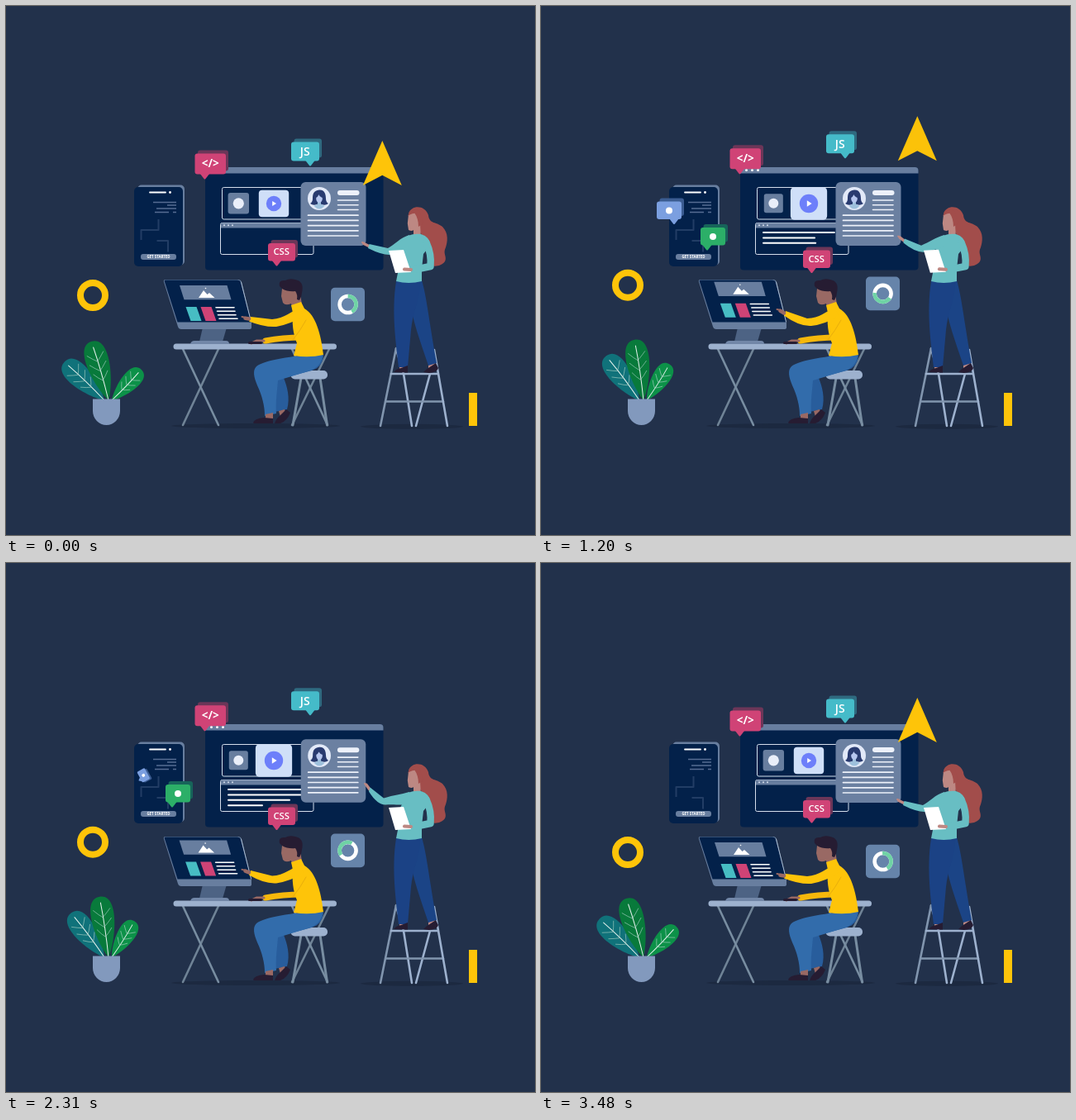
These frames come from a looping animation (640 px wide and 640 px high, 3.51 s). An HTML page with a canvas:

```html
<!DOCTYPE html>
<html lang="en">
<head>
<meta charset="utf-8">
<title>Web design team</title>
<style>
html, body { margin: 0; width: 100%; height: 100%; overflow: hidden; background: #22314b; }
canvas { display: block; width: 640px; height: 640px; }
</style>
</head>
<body>
<canvas id="stage" width="640" height="640"></canvas>
<script>
const ctx = document.getElementById('stage').getContext('2d');
const LOOP = 3510, STEP = 30;
const NAVY = '#03214a', SLATE = '#687e9f', STEEL = '#9db1ce', YELLOW = '#fec409';
const TEAL = '#68bec3', SKIN = '#bd8883', BROWN = '#996964', DARK = '#261c32';

const lerp = (a, b, k) => a + (b - a) * k;
const ramp = (t, a, b) => (1 - Math.cos(Math.PI * Math.min(1, Math.max(0, (t - a) / (b - a))))) / 2;
const rad = deg => deg * Math.PI / 180;

function fill(path, color) {
  ctx.fillStyle = color;
  ctx.fill(new Path2D(path));
}
function stroke(path, color, width = 1, cap = 'round') {
  ctx.strokeStyle = color;
  ctx.lineWidth = width;
  ctx.lineCap = cap;
  ctx.lineJoin = 'round';
  ctx.stroke(new Path2D(path));
}
function box(x, y, w, h, r, color) {
  ctx.fillStyle = color;
  ctx.beginPath();
  ctx.roundRect(x, y, w, h, r);
  ctx.fill();
}
function oval(x, y, rx, ry, color) {
  ctx.fillStyle = color;
  ctx.beginPath();
  ctx.ellipse(x, y, rx, ry, 0, 0, 2 * Math.PI);
  ctx.fill();
}
const disc = (x, y, r, color) => oval(x, y, r, r, color);
function arc(x, y, r, from, to, color, width) {
  ctx.strokeStyle = color;
  ctx.lineWidth = width;
  ctx.lineCap = 'butt';
  ctx.beginPath();
  ctx.arc(x, y, r, rad(from), rad(to));
  ctx.stroke();
}
function label(text, x, y, size, color = '#fff', weight = 600) {
  ctx.font = `${weight} ${size}px "Open Sans", "Noto Sans", sans-serif`;
  ctx.textAlign = 'center';
  ctx.textBaseline = 'alphabetic';
  ctx.fillStyle = color;
  ctx.fillText(text, x, y);
}
// Draws in a frame moved, turned and scaled about (x, y).
function about(x, y, angle, scale, draw) {
  ctx.save();
  ctx.translate(x, y);
  ctx.rotate(angle);
  ctx.scale(scale, scale);
  draw();
  ctx.restore();
}

function bubble(x, y, w, h, tail, color, shade) {
  box(x + 3.5, y - 4, w - 0.5, h, 3, shade);
  box(x, y, w, h, 3, color);
  fill(`M${x + tail - 6} ${y + h - 1}h12l-5 6.5q-1 1-2 0Z`, color);
}

function phone() {
  box(159, 216.5, 57, 97, 5, SLATE);
  box(155, 219, 59, 96, 5, NAVY);
  stroke('M174 225.5H193', '#fff', 1.8);
  disc(198.5, 225.5, 1.4, '#fff');
  stroke('M178 237.5H206M195 241H206M182 245H206M180 249.5H197M202 249.5H206', '#566c92', 1.7, 'butt');
  stroke('M163.5 283V271H184.5V258M182.5 284H196V297.5', '#223d65', 2, 'butt');
  box(163, 300, 43, 7, 3, SLATE);
  label('GET STARTED', 184.5, 305.3, 4.4, '#fff', 700);
}

function platformTag(tailX, tailY, dx, scale, turn, color, shade) {
  if (scale < 0.01) return;
  about(tailX, tailY, rad(turn * (1 - scale)), scale, () => {
    bubble(dx, -26.5, 30, 21.5, -dx, color, shade);
    disc(dx + 15, -15.5, 4, '#fff');
  });
}

function board(t, p) {
  box(241, 195, 215.5, 124.5, 4, NAVY);
  box(241, 195, 215.5, 7.5, [4, 4, 0, 0], SLATE);
  for (let i = 0; i < 3; i++) disc(248.5 + 7 * i, 198.5, 1.5, '#fff');

  ctx.strokeStyle = '#d5deec';
  ctx.lineWidth = 1;
  ctx.beginPath();
  ctx.roundRect(261.5, 219.5, 110, 38.5, 2);
  ctx.roundRect(259.5, 262.5, 112.5, 38, 2);
  ctx.stroke();

  about(281.3, 238.8, 0, 1 - 0.12 * p, () => {
    box(-12.7, -12.7, 25.4, 25.4, 3, SLATE);
    disc(0, 0, 6.6, '#e9eef9');
  });
  about(324, 239, 0, 1 + 0.28 * p, () => {
    box(-18.2, -16.3, 36.4, 32.6, 4, '#cfdff8');
    disc(0, 0, 9.2, '#6d7ffa');
    fill('M-1.8 -3L3 0L-1.8 3Z', '#fff');
  });

  box(260, 262.5, 112, 6, [2, 2, 0, 0], SLATE);
  for (let i = 0; i < 3; i++) disc(264 + 5 * i, 265.3, 1, '#d5deec');
  const away = 1 - ramp(t, 2760, 3260);
  [[450, 900, 92], [740, 750, 92], [600, 800, 74], [1200, 700, 41]].forEach(([start, span, len], i) => {
    const w = len * ramp(t, start, start + span) * away;
    if (w > 0.5) stroke(`M269 ${274 + 6.4 * i}h${w}`, '#fff', 2);
  });
}

function profileCard(t) {
  const press = ramp(t, 1680, 1980) - ramp(t, 2050, 2400);
  about(396, 251.5, 0, 1 - 0.04 * press, () => {
    ctx.translate(-396, -251.5);
    box(356.5, 213, 79, 77, 6, '#6b80a1');
    disc(379, 233, 14, '#e2e9f8');
    fill('M379 222.5C386 222 387 229 387 233Q387 237 390 239Q386 242 382 240H376Q372 242 368 239Q371 237 371 233C371 228 372 223 379 222.5Z', '#293b70');
    fill('M377 236h4v3.5l4.5 2.5q-6.5 7-13 0l4.5-2.5Z', '#9dc0dc');
    oval(379, 233, 3.8, 5, '#b6c6ef');
    fill('M374.5 232q0-6 4.5-6q5.500 0 4.500 6q-4-1-5-4q-1 3-4 4Z', '#293b70');
    box(401, 223, 26.5, 6, 3, '#edf1fa');
    stroke('M401.5 235H426M401.5 240.7H426M401.5 246.5H426', '#edf1fa', 1.6);
    for (let i = 0; i < 5; i++) stroke(`M365.5 ${253.2 + 6.2 * i}H426`, '#edf1fa', 1.7);
  });
}

function pointer(t) {
  const spin = 2 * Math.PI * ramp(t, 0, 690);
  const rise = t > 690 ? 73 * Math.min(1, (t - 690) / 800) ** 2 : 0;
  const back = t > 2000;
  ctx.globalAlpha = back ? ramp(t, 2760, 3250) : 1 - ramp(t, 1180, 1490);
  about(455.3, back ? 188.8 : 188.8 - rise, back ? 0 : spin, 1, () => fill('M0 -25.8L23.5 28.2L0 16L-23.5 28.2Z', YELLOW));
  ctx.globalAlpha = 1;
}

function leaf(x, y, angle, len, width, color) {
  about(x, y, rad(angle), 1, () => {
    const w = width, l = -len;
    fill(`M0 0C${-0.45 * w} ${0.25 * l} ${-0.95 * w} ${l} 0 ${l}C${0.95 * w} ${l} ${0.45 * w} ${0.25 * l} 0 0Z`, color);
    stroke(`M0 0Q${0.06 * w} ${0.5 * l} 0 ${0.9 * l}`, '#e3f1ec', 1);
    for (let i = 0; i < 3; i++) {
      const y0 = l * (0.34 + 0.16 * i), y1 = y0 + l * 0.13, reach = w * (0.34 + 0.05 * Math.min(i, 1));
      stroke(`M${-reach} ${y1}Q${-0.15 * w} ${y0 + l * 0.04} 0 ${y0}Q${0.15 * w} ${y0 + l * 0.04} ${reach} ${y1}`, '#a5cfc2', 0.6);
    }
  });
}
function plant(p) {
  leaf(119, 477, -46 + 12 * p, 67, 25, '#10727a');
  leaf(128, 477, 44 - 15 * p, 51.5, 20, '#0c9148');
  leaf(124, 477, -16 + 10 * p, 74, 26, '#087a3b');
  fill('M105 475.5H138V490A16.5 17 0 0 1 105 490Z', '#8299bd');
}

function computer(a) {
  fill('M238 389H267L262 406H234Z', '#4d6384');
  fill('M223 409Q224 405 228 405H266Q270 405 270 409Z', '#7287a8');
  fill('M193 331H281Q284 331 285 334L297 383V389Q297 391 294 391H212Q209 391 208 388L191 334Q190 331 193 331Z', SLATE);
  fill('M193 331.5H280Q283 331.5 284 334L296.500 382.5H207.5L192 334Q191 331.5 193 331.5Z', NAVY);
  stroke('M284.500 334L296.5 382', '#b5c4d8', 0.9);
  ctx.save();
  ctx.translate(-0.7 * a, -4.2 * a);
  fill('M210 338H267.5L272.5 355.2H215.5Z', SLATE);
  fill('M233 353L239 344L243.5 349L246 347L252.5 353Z', '#fff');
  disc(241.5, 341.5, 0.8, '#fff');
  fill('M217.5 364H230.5L236.5 381H223.5Z', '#47bdc3');
  fill('M235.5 364H248.5L254.5 381H241.5Z', '#cf4376');
  stroke('M254 364.7H276M255.5 369.2H277M256.5 373.7H278M258 378.2H280', '#fff', 1.6);
  ctx.restore();
}

function desk() {
  stroke('M257 415L214 507M391 415L346 507', '#6f8396', 2.6);
  stroke('M214 415L257 507M346 415L389 507', '#788da1', 2.6);
  box(202.5, 408.5, 197.5, 7, 3.5, STEEL);
}
function stool() {
  stroke('M357 450L347 507M380 450L388.5 507', '#788da1', 3);
  box(344.5, 441, 44.5, 10.5, 5, STEEL);
}

function man(a) {
  // legs and shoes
  fill('M384 422C350 425 325 428 313 438C309 445 320 470 325 491L340 488C344 474 340 460 336 450L370 441Q384 436 384 422Z', '#285d9c');
  fill('M383 420C345 424 313 428 303 436C298 441 300 449 304 459C310 472 313 484 313 496L327 493C326 478 328 466 329 453L362 443Q383 438 383 420Z', '#326cab');
  fill('M314 494L323 492L323 500H314Z', BROWN);
  fill('M330 490L337 488L339 494L332 497Z', BROWN);
  fill('M299 504Q301 499 312 498L323 499V505H301Q299 505 299 504Z', DARK);
  fill('M325 505Q327 499 332 495L339 488L344 492Q340 502 332 505Z', DARK);

  // head
  fill('M334 342L333 351L335 359Q338 363 345 360L347 369L358 361L355 342L343 338Z', BROWN);
  fill('M331 339Q329 331 338 332Q343 329 350 331Q360 333 358.5 344Q358 351 355 356L352 355Q353 349 350 345Q341 346 334 342Z', DARK);

  // far arm on the desk
  stroke('M358 401Q335 401 314 405', '#f6b80c', 7);
  stroke('M312 405L303 405L297 408', BROWN, 3);
  box(293, 406, 17, 3, 1.5, DARK);

  fill('M345 362L357 358L361 366C375 374 381 397 384 422Q367 426 348 423L352 408C347 396 346 383 347 371Z', YELLOW);
  stroke('M363 380Q356 393 347 404', '#e9ae0b', 1);

  // pointing arm
  const elbowY = lerp(384, 383, a), wristY = lerp(378.5, 371.5, a), tipY = lerp(376, 367, a);
  fill(`M356 365C345 369 337 378 322 ${elbowY - 5}L296 ${wristY - 2.5}L294 ${wristY + 3}Q313 ${elbowY + 5} 327 ${elbowY + 4}Q344 385 360 375Z`, YELLOW);
  stroke(`M294 ${wristY}L289.5 ${tipY + 1.8}`, BROWN, 4.5);
  stroke(`M290 ${tipY + 1}L285.5 ${tipY}`, BROWN, 2);
}

function ladder() {
  stroke('M472 415L481 445L491 508M513 445L496 508', STEEL, 2.6);
  stroke('M472 414L453 508M459 478.5H529', '#8195ae', 2.6);
  stroke('M518 416L534 508M466 445H523', STEEL, 2.6);
}

function woman(q, w) {
  // legs and shoes
  fill('M476 432H485V440H476ZM511 430H519V438H511Z', SKIN);
  fill('M486 333L503 332C509 352 511 376 521 432L511 435C501 405 492 382 487 350Z', '#1b4486');
  fill('M472 333H501C502 351 492 370 490 392L486 437L475 437C472 410 466 370 472 333Z', '#1b4285');
  fill('M469 443Q472 439 478 438L486 435V443.5Z', DARK);
  fill('M505 443Q510 438 514 436L520 432L523 438Q522 443 512 444Z', DARK);

  const nod = q * q;
  about(494, 276 + 2 * nod, -0.16 * nod, 1, () => {
    ctx.translate(-494, -276);
    fill('M487 251C491 240 507 241 511 253C512 264 521 261 528 267C536 275 534 286 532 292C528 300 534 303 531 309C526 316 515 316 512 312C517 305 510 298 508 290C509 280 500 278 499 265Z', '#a24d4b');
    fill('M487 252L485.8 263L487 271Q491 273 493 271L493 280L502 280L501 264L499 250Z', SKIN);
    fill('M486 254Q491 244 500 248L505 263L499 267Q499 257 494 250Q491 251 486 254Z', '#a24d4b');
  });

  fill('M486 278Q494 275 502 276Q513 279 513 290L505 300L503 318L503 333Q487 337 472 333L475 318L477 296Z', TEAL);

  // reaching arm
  const ex = lerp(462, 457, w), ey = lerp(297, 288.5, w);
  const wx = lerp(439, 440, w), wy = lerp(290.5, 274, w);
  const hx = lerp(431, 434, w) + 0.5 * q, hy = lerp(286, 267, w) - 0.5 * q;
  stroke(`M${wx} ${wy}L${hx + 2} ${hy + 1.5}`, SKIN, 3.6);
  stroke(`M${hx + 2} ${hy + 1}L${hx} ${hy}`, SKIN, 2);
  fill(`M488 277C477 280 470 ${ey - 8} ${ex} ${ey - 4}L${wx + 0.5} ${wy - 2.5}L${wx - 1} ${wy + 2.5}Q${ex - 8} ${ey + 4} ${ex + 2} ${ey + 4}C472 ${ey + 3} 480 294 488 291Z`, TEAL);

  // sheet and the arm holding it
  const at = (x0, y0, x1, y1) => `${lerp(x0, x1, q)} ${lerp(y0, y1, q)}`;
  fill(`M${at(463, 296, 463, 278)}L${at(481, 295, 480, 283)}L${at(490, 322, 479, 312)}L${at(471, 323, 461, 305)}Z`, '#fff');
  const handX = lerp(482, 477, q), handY = lerp(319, 308, q);
  stroke(`M508.5 286Q${at(515, 300, 511, 298)} ${at(513.5, 315, 506, 312)}L${handX + 12} ${handY}`, TEAL, 8.5);
  stroke(`M${handX + 8} ${handY}L${handX} ${handY - 0.5}`, SKIN, 4);
}

function donut(t, p) {
  const y = 361 - 17 * p, turn = 360 * t / LOOP;
  box(393, y - 20.3, 41, 40.6, 5, '#6684aa');
  arc(413.6, y, 10, 0, 360, '#fff', 4.6);
  arc(413.6, y, 10, turn - 90, turn + 62, '#6fd3a5', 4.6);
}

function render(t) {
  const p = (1 - Math.cos(2 * Math.PI * t / LOOP)) / 2;
  const point = ramp(t, 60, 450) - ramp(t, 2100, 2560);
  const read = ramp(t, 30, 420) - ramp(t, 550, 1250);
  const reach = ramp(t, 1020, 1440) - ramp(t, 2760, 3260);
  const pop = delay => ramp(t, 30 + delay, 550 + delay) - ramp(t, 2030 + delay, 2580 + delay);

  ctx.fillStyle = '#22314b';
  ctx.fillRect(0, 0, 640, 640);
  oval(302, 508, 102, 3, '#1c2940');
  oval(491, 508.8, 62, 3, '#1c2940');

  arc(105, 350 - 16 * p, 15, 0, 360, YELLOW, 8);
  box(560, 468, 10, 40, 0, YELLOW);
  plant(p);

  phone();
  platformTag(161, 263, -21, pop(0), 120, '#7b9fe0', '#3b5c91');
  platformTag(201, 294.5, -8, pop(430), -120, '#2caf68', '#17645a');

  board(t, p);
  profileCard(t);
  pointer(t);
  donut(t, p);

  const codeY = 178.5 - 8 * p, scriptY = 164.5 - 12 * p, styleY = 287 + 11 * p;
  bubble(228.5, codeY, 37.5, 25, 12, '#d04376', '#6c3658');
  label('</>', 247.2, codeY + 16.3, 13.5, '#fff', 700);
  bubble(345, scriptY, 34, 23, 23, '#45bbc9', '#2f6a80');
  label('JS', 361.8, scriptY + 16.5, 14);

  desk();
  computer(point);
  stool();
  man(point);
  bubble(317, styleY, 33, 21.5, 10.5, '#d04376', '#6c3658');
  label('CSS', 333.2, styleY + 14.2, 11.3);

  ladder();
  woman(read, reach);
}

const start = performance.now();
function tick() {
  const t = (performance.now() - start) % LOOP;
  render(Math.floor(t / STEP) * STEP);
  requestAnimationFrame(tick);
}
tick();
</script>
</body>
</html>
```
